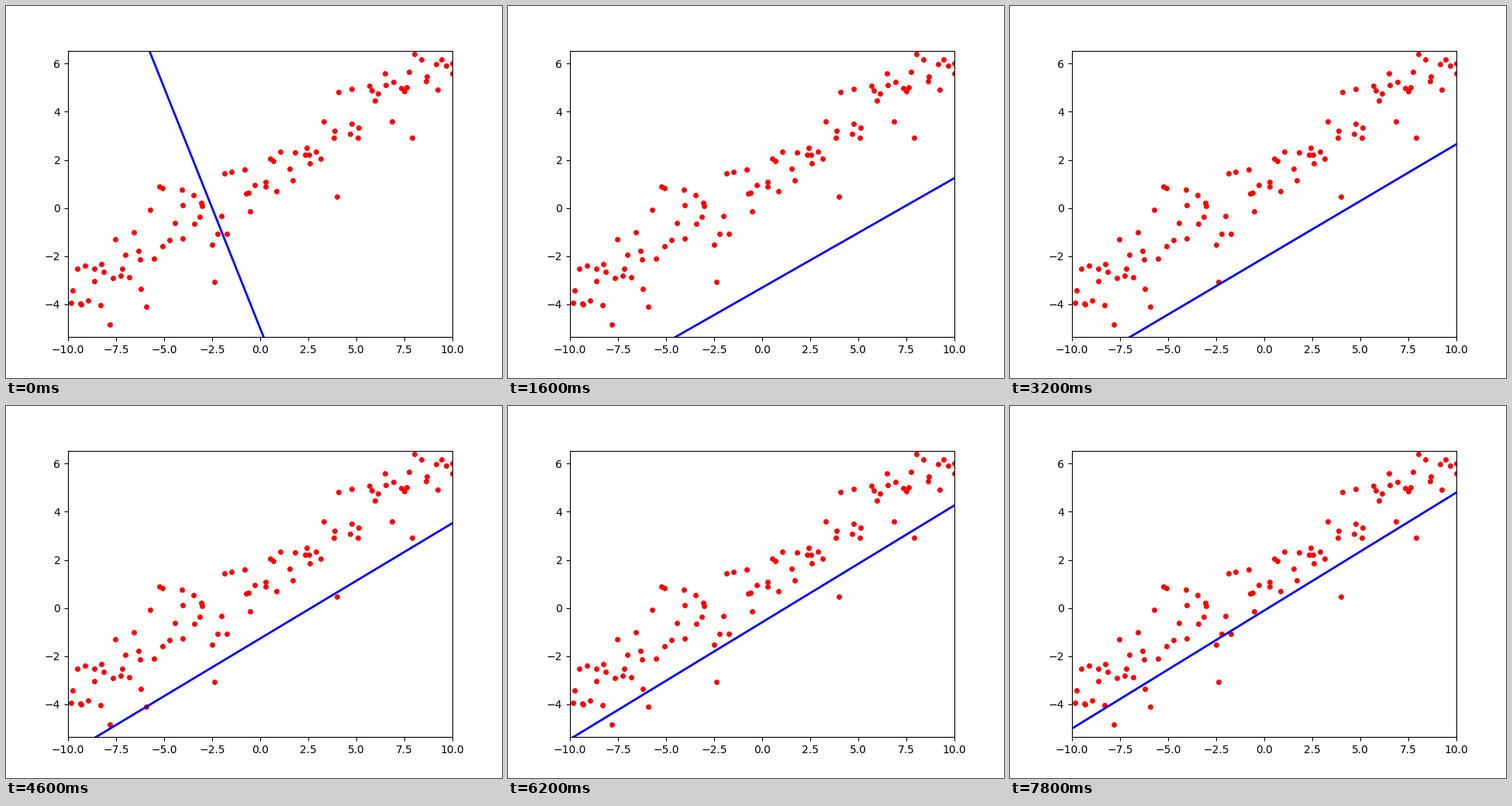
Write a matplotlib script that moves like this. It is 640 px wide and 480 px high and loops after 8 s.

```python
import matplotlib.pyplot as plt
import numpy as np
from matplotlib.animation import FuncAnimation

STEPS, INTERVAL = 40, 200
POINTS, SEED = 100, 4
RATE = 0.02
W0, B0 = -2.0, -5.0
W_TRUE, B_TRUE = 0.502, 1.16
X_LIM = (-10, 10)
Y_LIM = (-5.36, 6.535)


def make_data():
    """Noisy samples whose least-squares line is exactly the true one."""
    rng = np.random.default_rng(SEED)
    u = np.linspace(-1, 1, POINTS) + rng.uniform(-0.03, 0.03, POINTS)
    u = np.clip(u, -1, 1)
    # Slightly denser towards both ends and a little left of centre.
    x = 10 * u * (1.1 - 0.1 * u**2) - 0.54 * (1 - u**2)
    # The scatter narrows towards the right.
    noise = rng.normal(0, 1, POINTS) * (1 - 0.03 * x)
    noise -= np.polyval(np.polyfit(x, noise, 1), x)
    return x, W_TRUE * x + B_TRUE + noise


x, y = make_data()


def fit(steps):
    """Gradient descent on the mean squared error."""
    w, b = W0, B0
    for _ in range(steps):
        err = w * x + b - y
        w, b = w - RATE * 2 * np.mean(err * x), b - RATE * 2 * np.mean(err)
    return w, b


fig, ax = plt.subplots(figsize=(6.4, 4.8), dpi=100)
ax.set_xlim(*X_LIM)
ax.set_ylim(*Y_LIM)
ax.plot(x, y, "ro", markersize=4)
ends = np.array(X_LIM)
line, = ax.plot(ends, W0 * ends + B0, "b-", linewidth=2)


def update(step):
    w, b = fit(step)
    line.set_ydata(w * ends + b)
    return line,


anim = FuncAnimation(fig, update, frames=STEPS, interval=INTERVAL,
                     repeat=True, repeat_delay=0)
plt.show()
```
